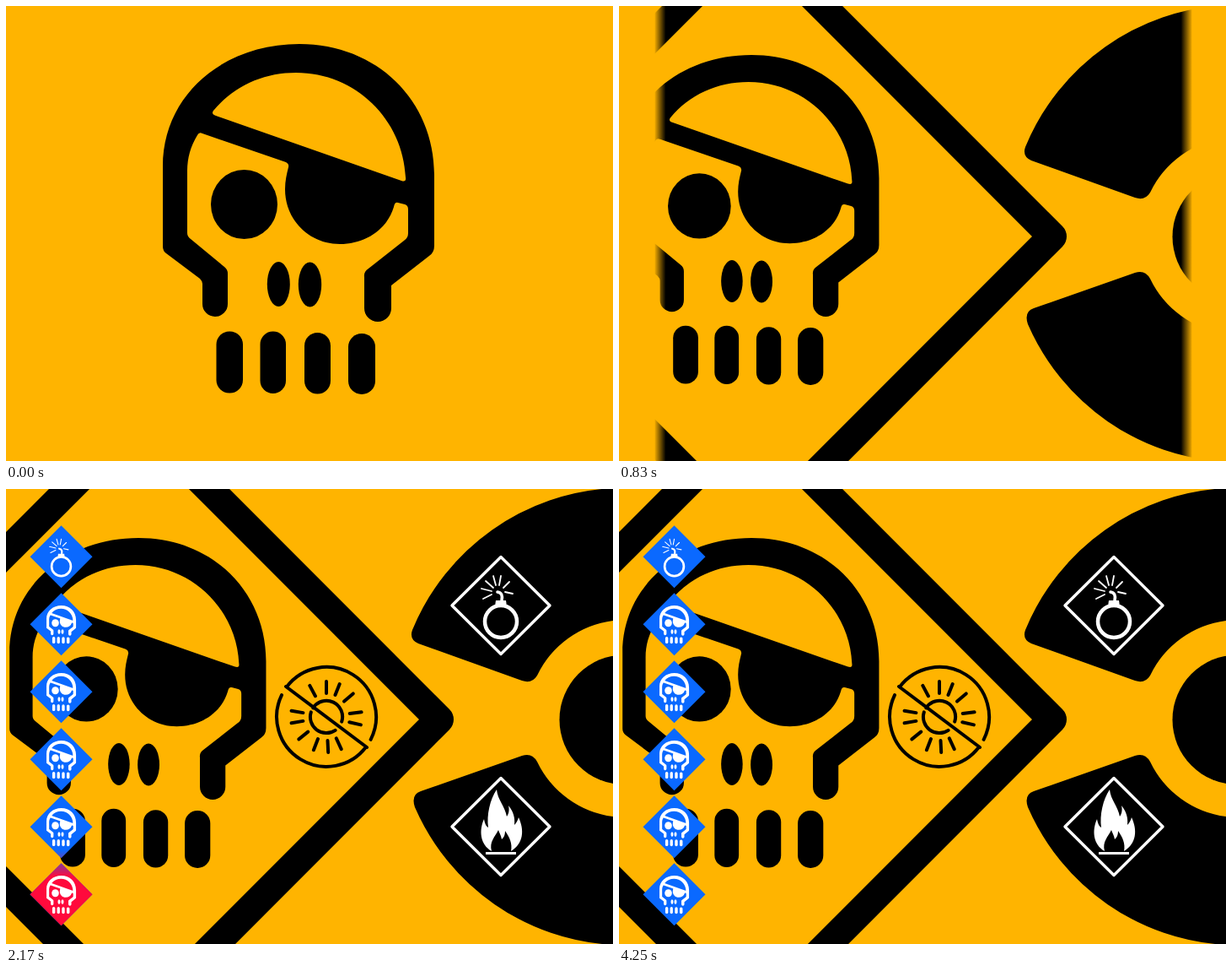
An HTML page that plays this animation: 720x539 px, repeating every 4.33 s.

```html
<!DOCTYPE html>
<html lang="en">
<head>
<meta charset="utf-8">
<title>Hazard signs</title>
<style>
  html, body { margin: 0; width: 100%; height: 100%; overflow: hidden; background: #ffb400; }
  svg { display: block; width: 100vw; height: 100vh; }
  .line { fill: none; stroke: #000; stroke-linejoin: round; stroke-linecap: round; }
  .white { fill: #fff; }
  .white .line, .frame { stroke: #fff; }
</style>
</head>
<body>
<svg viewBox="0 0 720 539" preserveAspectRatio="none">
  <defs>
    <g id="skull">
      <path fill-rule="evenodd" d="M186 190C186 105 258 45 348 45C440 45 508 112 508 200V284Q508 292 502 296L457 331V358A16 16 0 0 1 425 358V321Q424 315 430 311L472 278Q477 275 477 269V241Q477 236 473 235L465 233Q461 232 460 238C452 265 426 282 396 282C359 282 331 253 331 217C331 207 333 199 335 191Q336 187 332 185L233 151Q229 149 227 153C219 166 215 180 215 195V269Q215 273 219 276L259 309Q263 312 263 317V353A15 15 0 0 1 233 353V329Q233 326 230 323L190 293Q186 290 186 285Z
        M246 124C270 95 305 79 344 79C415 79 471 135 474 203Q475 209 469 207L249 130Q243 128 246 124Z"/>
      <ellipse cx="282.5" cy="235" rx="39.5" ry="41"/>
      <ellipse cx="323.3" cy="329.5" rx="13.5" ry="26.5"/>
      <ellipse cx="360.5" cy="330" rx="13.7" ry="26.5"/>
      <rect x="249.5" y="385.5" width="31.5" height="73" rx="15.5"/>
      <rect x="301.5" y="385.5" width="30.5" height="73.5" rx="15.2"/>
      <rect x="354" y="387" width="31" height="72.5" rx="15.4"/>
      <rect x="406" y="388" width="32" height="72" rx="15.8"/>
    </g>
    <g id="bomb" class="white">
      <circle class="line" cx="0" cy="19" r="19" stroke-width="4.5"/>
      <path d="M-7 1L-6 -6H6L7 1Z"/>
      <path class="line" stroke-width="3.6" d="M1 -6Q3 -15 -4 -16"/>
      <path class="line" stroke-width="1.8" d="M-11 -17L-23 -20M-11 -13L-21 -8M-9 -21L-18 -29M-6 -24L-9 -35M-2 -24L0 -35M3 -21L10 -28M5 -16L14 -14"/>
    </g>
    <path id="flame" class="white" d="M-11 29C-25 21 -26 4 -20 -9C-19 -3 -17 0 -15 1C-17 -14 -13 -32 -5 -44C-4 -32 5 -24 7 -12C10 -16 10 -21 9 -25C15 -18 17 -10 16 -2C18 -4 20 -7 21 -11C28 4 27 20 12 29C14 20 10 12 5 5C5 11 3 13 1 15C0 10 -2 7 -3 4C-7 12 -14 18 -11 29ZM-18 30H18V33H-18Z"/>
    <path id="rhomb" d="M0 -37L37 0L0 37L-37 0Z"/>
    <clipPath id="tiles"></clipPath>
    <linearGradient id="soft">
      <stop offset="0" stop-color="#ffb400"/>
      <stop offset="1" stop-color="#ffb400" stop-opacity="0"/>
    </linearGradient>
    <linearGradient id="glow" x2="0" y2="1">
      <stop offset="0" stop-color="#ff0a3c" stop-opacity="0"/>
      <stop offset=".14" stop-color="#ff0a3c"/>
      <stop offset=".86" stop-color="#ff0a3c"/>
      <stop offset="1" stop-color="#ff0a3c" stop-opacity="0"/>
    </linearGradient>
    <g id="curtain">
      <rect x="-800" y="-1" width="794" height="542" fill="#ffb400"/>
      <rect x="-7" y="-1" width="14" height="542" fill="url(#soft)"/>
    </g>
  </defs>

  <rect width="720" height="539" fill="#ffb400"/>

  <g id="intro">
    <use href="#skull"/>
    <path id="border" class="line" stroke-width="33.5" d="M0 -383L383 0L0 383L-383 0Z"/>
  </g>

  <g id="board">
    <use href="#skull" transform="translate(-171.6 15.6) scale(.945 .942)"/>
    <path class="line" stroke-width="34" d="M158 -83L514 273L158 629L-198 273Z"/>
    <path d="M720 -1A272 272 0 0 0 482 167Q478 178 489 183L612 227Q624 231 630 221A116 116 0 0 1 720 156Z"/>
    <path d="M720 540A272 272 0 0 1 485 377Q480 362 492 358L612 316Q624 312 630 323A116 116 0 0 0 720 388Z"/>
    <circle cx="733.3" cy="273.3" r="76.8"/>
  </g>

  <use id="left" href="#curtain"/>
  <use id="right" href="#curtain"/>

  <g id="signs">
    <g class="line" id="sun" transform="translate(380 270)" stroke-width="4"></g>
    <g transform="translate(587 138)">
      <path class="line frame" stroke-width="3.4" d="M0 -57.5L58 0L0 57.5L-58 0Z"/>
      <use href="#bomb"/>
    </g>
    <g transform="translate(587 400)">
      <path class="line frame" stroke-width="3.4" d="M0 -57.5L58 0L0 57.5L-58 0Z"/>
      <use href="#flame"/>
    </g>
  </g>

  <g id="column">
    <g clip-path="url(#tiles)">
      <rect x="20" y="30" width="100" height="500" fill="#0a69ff"/>
      <rect id="band" x="20" y="-15" width="100" height="224" fill="url(#glow)"/>
    </g>
    <g id="marks"></g>
  </g>
</svg>
<script>
const LOOP = 4330, FPS = 0.012, MID = 361, TILES = 6;
const $ = id => document.getElementById(id);
const clamp = v => Math.max(0, Math.min(1, v));
const part = (t, from, to) => clamp((t - from) / (to - from));
const easeOut = p => 1 - (1 - p) ** 3;
const tileAt = i => `translate(65.5 ${80.3 + 80 * i})`;

function add(parent, name, attrs) {
  const el = document.createElementNS('http://www.w3.org/2000/svg', name);
  for (const key in attrs) el.setAttribute(key, attrs[key]);
  return parent.appendChild(el);
}

function polar(deg, r) {
  const a = deg * Math.PI / 180;
  return `${(r * Math.cos(a)).toFixed(1)} ${(r * Math.sin(a)).toFixed(1)}`;
}

function arc(from, to, r) {
  const large = to - from > 180 ? 1 : 0;
  return `M${polar(from, r)}A${r} ${r} 0 ${large} 1 ${polar(to, r)}`;
}

function buildSun() {
  const rays = [-90, -118, -68, -41, -8, 13, 190, 170, 141, 111, 87, 65];
  const d = rays.map(a => `M${polar(a, 28)}L${polar(a, 42)}`).join('') +
    arc(-143, 27, 59) + arc(37, 206, 59) + 'M-48 -36L48 36' +
    arc(-146, 17, 19) + arc(56, 197, 19);
  add($('sun'), 'path', { d });
}

function buildColumn() {
  const tiles = [];
  for (let i = 0; i < TILES; i++) {
    const clip = add($('tiles'), 'use', { href: '#rhomb' });
    const mark = add($('marks'), 'g', {});
    if (i) add(mark, 'use', { href: '#skull', fill: '#fff', transform: 'translate(-37.8 -27.2) scale(.109)' });
    else add(mark, 'use', { href: '#bomb', transform: 'scale(.6)' });
    tiles.push([clip, mark]);
  }
  return tiles;
}

buildSun();
const tiles = buildColumn();

// Half width of the visible strip: closes on the first scene, opens on the second.
function opening(t) {
  return t < 622 ? 1.5 * (619 - t) : 1.5 * (t - 625);
}

// Lower edge of the red glow, running down the column again and again.
function glowEdge(t) {
  const run = 529, speed = 0.756;
  if (t > 2167) return 108 + (t - 2167) * 0.98;
  return 108 + run - (((2167 - t) * speed) % run);
}

function draw(t) {
  const first = t < 622;
  $('intro').style.display = first ? '' : 'none';
  $('board').style.display = first ? 'none' : '';

  const zoom = 1.85 - 0.85 * easeOut(part(t, 0, 333));
  $('border').setAttribute('transform', `translate(352.5 274) scale(${zoom})`);

  const half = Math.max(0, Math.min(400, opening(t)));
  $('left').setAttribute('transform', `translate(${MID - half})`);
  $('right').setAttribute('transform', `translate(${MID + half}) scale(-1 1)`);

  $('signs').style.opacity = part(t, 880, 1160);
  $('column').style.display = t < 900 ? 'none' : '';
  tiles.forEach((pair, i) => {
    const size = easeOut(part(t, 900 + 35 * i, 1060 + 35 * i));
    for (const el of pair) el.setAttribute('transform', `${tileAt(i)} scale(${size})`);
  });

  // The next glow enters while the previous one leaves, so the band is drawn at both places.
  const edge = glowEdge(t);
  $('band').setAttribute('transform', `translate(0 ${edge - 194})`);
  $('trail').setAttribute('transform', `translate(0 ${edge + 335})`);
}

const trail = $('band').cloneNode();
trail.id = 'trail';
$('band').after(trail);

function tick() {
  const t = performance.now() % LOOP;
  draw(Math.min(51, Math.floor((t + 7) * FPS)) / FPS);
  requestAnimationFrame(tick);
}
tick();
</script>
</body>
</html>
```
